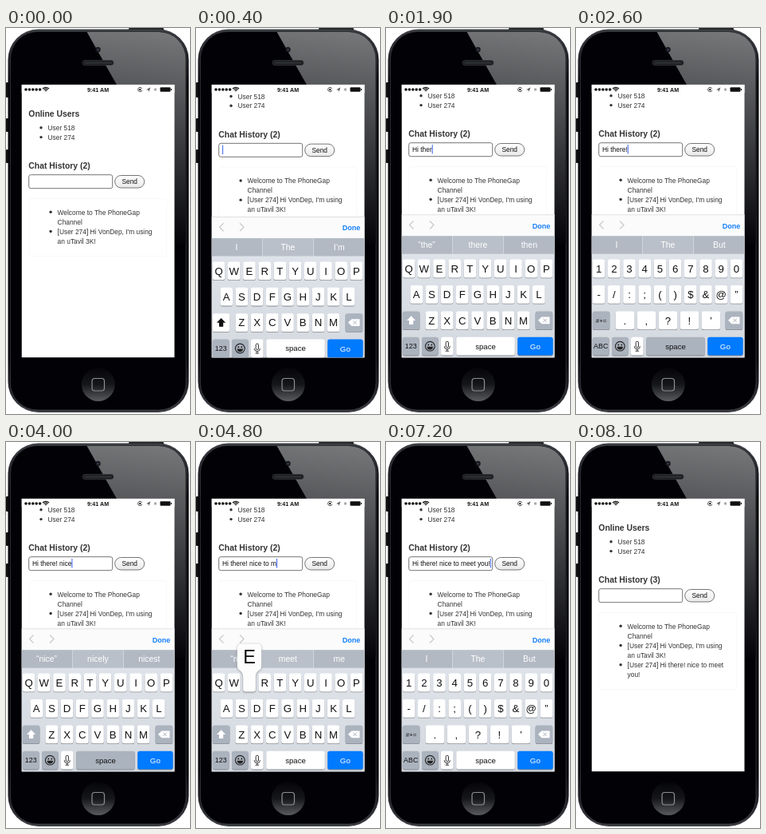
An HTML page with a canvas that plays this animation: 231 px wide and 483 px high, repeating every 8.3 s.

```html
<!DOCTYPE html>
<html lang="en">
<head>
<meta charset="utf-8">
<title>Phone chat</title>
<style>
html, body { margin: 0; width: 100%; height: 100%; overflow: hidden; background: #fff; }
canvas { display: block; width: 231px; height: 483px; }
</style>
</head>
<body>
<canvas id="stage"></canvas>
<script>
const W = 231, H = 483, LOOP = 8300, STEP = 100;
const canvas = document.getElementById('stage');
const c = canvas.getContext('2d');
const dpr = window.devicePixelRatio || 1;
canvas.width = W * dpr;
canvas.height = H * dpr;

const FONT = '"Liberation Sans", Arial, sans-serif';
const BLUE = '#007aff', GREY = '#abb3be', INK = '#333';
const SX = 19.5, SY = 70.7, SW = 192.2, SH = 341.7;

// A press lasts one step; its effect shows on release.
const presses = [
  [600, 'H'], [800, 'i'], [1100, ' '],
  [1400, 't'], [1500, 'h'], [1700, 'e'], [1800, 'r'], [2000, 'e'],
  [2200, '123'], [2400, '!'], [2600, ' '],
  [3000, 'n'], [3200, 'i'], [3500, 'c'], [3700, 'e'], [4000, ' '],
  [4200, 't'], [4300, 'o'], [4500, ' '],
  [4600, 'm'], [4800, 'e'], [5100, 'e'], [5400, 't'], [5600, ' '],
  [6300, 'y'], [6500, 'o'], [6700, 'u'],
  [6900, '123'], [7100, '!'], [7400, 'Go']
];

const hints = {
  '': ['I', 'The', 'I’m'],
  'H': ['“H”', 'He', 'How'],
  'Hi': ['“Hi”', 'His', 'Him'],
  'Hi ': ['’', 'VonDep', '’m'],
  'Hi t': ['“t”', 'there', 'to'],
  'Hi the': ['“the”', 'there', 'then'],
  'Hi there!': ['I', 'The', 'But'],
  'Hi there! n': ['“n”', 'not', 'now'],
  'Hi there! ni': ['“ni”', 'nice', 'night'],
  'Hi there! nice': ['“nice”', 'nicely', 'nicest'],
  'Hi there! nice ': ['to', 'and', 'day'],
  'Hi there! nice t': ['“t”', 'to', 'the'],
  'Hi there! nice to ': ['see', 'meet', 'be'],
  'Hi there! nice to m': ['“m”', 'meet', 'me'],
  'Hi there! nice to mee': ['“mee”', 'meet', 'meets'],
  'Hi there! nice to meet ': ['you', 'the', 'with'],
  'Hi there! nice to meet y': ['“y”', 'you', 'your'],
  'Hi there! nice to meet you!': ['I', 'The', 'But']
};

function stateAt(t) {
  const s = { text: '', hint: hints[''], symbols: false, sent: false, down: null };
  for (const [at, key] of presses) {
    if (t < at) break;
    if (t < at + STEP) { s.down = key; break; }
    if (key === '123') s.symbols = true;
    else if (key === 'Go') { s.text = ''; s.sent = true; }
    else {
      s.text += key;
      if (key === ' ') s.symbols = false;
    }
    s.hint = hints[s.text] || s.hint;
  }
  const clamp = x => Math.max(0, Math.min(1, x));
  const ease = x => 1 - (1 - x) ** 3;
  s.up = ease(clamp((t - 100) / 400)) * (1 - ease(clamp((t - 7700) / 400)));
  s.focus = t >= 100 && t < 7800;
  return s;
}

function round(x, y, w, h, r, fill, stroke, lw = 1) {
  c.beginPath();
  c.roundRect(x, y, w, h, r);
  if (fill) { c.fillStyle = fill; c.fill(); }
  if (stroke) { c.strokeStyle = stroke; c.lineWidth = lw; c.stroke(); }
}

function dot(x, y, r, fill) {
  c.beginPath();
  c.arc(x, y, r, 0, Math.PI * 2);
  c.fillStyle = fill;
  c.fill();
}

function poly(points, fill) {
  c.beginPath();
  points.forEach(([x, y]) => c.lineTo(x, y));
  c.closePath();
  c.fillStyle = fill;
  c.fill();
}

function line(points, stroke, lw) {
  c.beginPath();
  points.forEach(([x, y]) => c.lineTo(x, y));
  c.strokeStyle = stroke;
  c.lineWidth = lw;
  c.stroke();
}

function text(str, x, y, size, color = INK, weight = '', align = 'left') {
  c.font = `${weight} ${size}px ${FONT}`;
  c.textAlign = align;
  c.fillStyle = color;
  c.fillText(str, x, y);
}

function gradient(x0, y0, x1, y1, ...stops) {
  const g = c.createLinearGradient(x0, y0, x1, y1);
  stops.forEach((s, i) => g.addColorStop(i / (stops.length - 1), s));
  return g;
}

function drawPhone() {
  for (const [y, h] of [[68, 19], [113, 17], [152, 17]]) round(0, y, 5, h, 1, '#111');
  round(154, 0, 44, 4, 1, '#222');
  const edge = '#08080c', shine = '#3c3e44';
  round(2.5, 1.5, 227, 479.5, 38,
    gradient(0, 2, 0, 481, shine, edge, edge, edge, edge, edge, edge, shine));
  round(5.5, 4.5, 220.5, 473.5, 34, '#010106', '#35373c', 0.8);

  c.save();
  c.beginPath();
  c.roundRect(6, 5, 219.5, 472.5, 33.5);
  c.clip();
  poly([[101, 4], [226, 4], [226, 270], [211, 270], [211, 71], [139, 71]],
    gradient(200, 4, 170, 270, '#77787a', '#3c3d40', '#010106'));
  c.restore();

  dot(115.5, 27, 3.2, '#16171b');
  dot(115.5, 27, 1.5, '#34384a');
  round(96, 40.5, 39, 6, 3, '#17181a', '#3a3b3e', 0.8);
  round(98, 42, 35, 3, 1.5, '#2c2d30');

  dot(115.8, 446, 21, gradient(0, 425, 0, 467, '#050509', '#15161a', '#5a5b5e'));
  round(108, 438.5, 15.5, 15.5, 3.5, null, '#8e8f93', 1.2);
}

function drawStatus() {
  c.fillStyle = '#fff';
  c.fillRect(SX, SY, SW, 10.5);
  for (let i = 0; i < 5; i++) dot(25 + i * 4.4, 77, 1.8, '#111');
  for (const r of [1.5, 3.5, 5.5]) {
    c.beginPath();
    c.arc(50, 79.8, r, -Math.PI * 0.76, -Math.PI * 0.24);
    c.strokeStyle = '#111';
    c.lineWidth = 1.2;
    c.stroke();
  }
  text('9:41 AM', 115.5, 79.6, 7.1, '#111', 'bold', 'center');
  c.beginPath();
  c.arc(168.3, 77, 2.7, 0.3, 5.8);
  c.strokeStyle = '#222';
  c.lineWidth = 0.8;
  c.stroke();
  c.fillStyle = '#222';
  c.fillRect(167.2, 76, 2.2, 2.2);
  poly([[176, 77.2], [181.5, 74.3], [179.2, 80], [178.7, 77.5]], '#555');
  c.fillStyle = '#aaa';
  c.fillRect(186, 75.5, 3, 3);
  round(193.5, 74.3, 13, 5.4, 1, '#111');
  c.fillRect(207, 76, 1, 2);
}

function bullet(x, y, str) {
  dot(x - 8.5, y - 3.2, 1.7, INK);
  text(str, x, y, 8.4);
}

function drawPage(s) {
  c.save();
  c.translate(0, -40 * s.up);
  text('Online Users', 28.3, 110.5, 10.4, INK, 'bold');
  bullet(52.5, 128, 'User 518');
  bullet(52.5, 139.8, 'User 274');
  text(`Chat History (${s.sent ? 3 : 2})`, 28.3, 176.3, 10.4, INK, 'bold');

  round(28.7, 183.7, 105, 17, 2.5, '#fff', '#747474');
  text(s.text, 33, 195, 8.4, '#111');
  if (s.focus) {
    c.fillStyle = '#4a6ff0';
    c.fillRect(33 + c.measureText(s.text).width, 186, 1.1, 11.5);
  }
  round(136.7, 184.5, 37, 15.5, 7.7, gradient(0, 184, 0, 200, '#fff', '#e9e9e9'), '#666', 0.9);
  text('Send', 155.2, 195, 8.4, '#111', '', 'center');

  round(28.5, 213.5, 173, s.sent ? 96 : 72, 2, null, '#f9f9f9');
  bullet(64.6, 233.5, 'Welcome to The PhoneGap');
  text('Channel', 64.6, 245.6, 8.4);
  bullet(64.6, 257.7, '[User 274] Hi VonDep, I\'m using');
  text('an uTavil 3K!', 64.6, 269.8, 8.4);
  if (s.sent) {
    bullet(64.6, 281.9, '[User 274] Hi there! nice to meet');
    text('you!', 64.6, 294, 8.4);
  }
  c.restore();
}

const rowY = i => 289.6 + i * 32.4;

function key(x, row, w, label, size, fill = '#fff', color = '#111') {
  const y = rowY(row);
  round(x, y + 0.8, w, 22.8, 2.6, '#888c92');
  round(x, y, w, 22.8, 2.6, fill);
  if (label) text(label, x + w / 2, y + 11.4 + size * 0.36, size, color, '', 'center');
}

function popup(x, row, w, label) {
  const y = rowY(row), top = y - 37, m = x + w / 2, half = Math.max(15.3, w / 2 + 6.5);
  c.save();
  c.shadowColor = 'rgba(0,0,0,.4)';
  c.shadowBlur = 2.5 * dpr;
  c.shadowOffsetY = 0.5 * dpr;
  c.beginPath();
  c.moveTo(m - half + 5, top);
  c.arcTo(m + half, top, m + half, top + 6, 5);
  c.lineTo(m + half, y - 9);
  c.bezierCurveTo(m + half, y - 3, x + w, y - 4, x + w, y + 4);
  c.arcTo(x + w, y + 22.8, x, y + 22.8, 2.6);
  c.arcTo(x, y + 22.8, x, y, 2.6);
  c.lineTo(x, y + 4);
  c.bezierCurveTo(x, y - 4, m - half, y - 3, m - half, y - 9);
  c.arcTo(m - half, top, m - half + 5, top, 5);
  c.closePath();
  c.fillStyle = '#fdfdfd';
  c.fill();
  c.restore();
  text(label, m, top + 24.5, 23.5, '#111', '', 'center');
}

function drawShift(on) {
  key(20.8, 2, 21.6, '', 0, on ? '#fff' : GREY);
  poly([[31.6, 360.2], [37.2, 366], [34.2, 366], [34.2, 371], [29, 371], [29, 366], [26, 366]],
    on ? '#111' : '#fff');
}

function drawDelete() {
  key(187.6, 2, 21.6, '', 0, GREY);
  poly([[191, 365.8], [195.4, 361.4], [205.5, 361.4], [205.5, 370.2], [195.4, 370.2]], '#fff');
  line([[197.3, 363.6], [201.7, 368]], GREY, 1);
  line([[201.7, 363.6], [197.3, 368]], GREY, 1);
}

function drawFace(x, y) {
  dot(x, y, 6.4, '#222');
  dot(x, y, 5.3, GREY);
  dot(x - 2, y - 1.8, 1, '#222');
  dot(x + 2, y - 1.8, 1, '#222');
  c.beginPath();
  c.arc(x, y + 0.6, 3.7, 0, Math.PI);
  c.closePath();
  c.fillStyle = '#222';
  c.fill();
}

function drawMic(x, y) {
  round(x - 1.7, y - 6, 3.4, 7.5, 1.7, '#fff', '#222', 0.9);
  c.beginPath();
  c.arc(x, y, 3.6, 0, Math.PI);
  c.stroke();
  line([[x, y + 3.6], [x, y + 6]], '#222', 0.9);
  line([[x - 2.3, y + 6], [x + 2.3, y + 6]], '#222', 0.9);
}

function drawKeys(s) {
  const rows = s.symbols ? ['1234567890', '-/:;()$&@”', '.,?!’'] : ['QWERTYUIOP', 'ASDFGHJKL', 'ZXCVBNM'];
  const starts = s.symbols ? [20.8, 20.8, 49.7] : [20.8, 30.4, 49.6];
  let pressed = null;
  rows.forEach((row, r) => {
    const wide = s.symbols && r === 2;
    const w = wide ? 23.4 : 15.6, pitch = wide ? 27 : 19.2;
    [...row].forEach((ch, i) => {
      const x = starts[r] + i * pitch;
      key(x, r, w, ch, 13.2);
      if (s.down && s.down.toUpperCase() === ch) pressed = [x, r, w, ch];
    });
  });

  if (s.symbols) key(20.8, 2, 21.6, '#+=', 8, GREY);
  else drawShift(s.text === '');
  drawDelete();

  key(20.8, 3, 20.8, s.symbols ? 'ABC' : '123', 8.9, s.down === '123' ? '#fff' : GREY);
  key(45, 3, 20.6, '', 0, GREY);
  drawFace(55.3, 398.2);
  key(69, 3, 15.6, '', 0);
  drawMic(76.8, 398.2);
  key(88.2, 3, 73.6, 'space', 9.6, s.down === ' ' ? GREY : '#fff');
  const go = s.down === 'Go';
  key(165.2, 3, 44.4, 'Go', 9.8, go ? '#fff' : BLUE, go ? '#111' : '#fff');
  if (pressed) popup(...pressed);
}

function drawKeyboard(s) {
  if (s.up <= 0) return;
  c.save();
  c.translate(0, (1 - s.up) * 179);
  c.fillStyle = '#fbfbfb';
  c.fillRect(SX, 233.5, SW, 27);
  c.fillStyle = '#d4d5d7';
  c.fillRect(SX, 233.5, SW, 0.7);
  line([[34.5, 241.5], [29.5, 246.5], [34.5, 251.5]], '#c9c9cb', 1.2);
  line([[55, 241.5], [60, 246.5], [55, 251.5]], '#c9c9cb', 1.2);
  text('Done', 206.3, 250.7, 9, '#147efb', 'bold', 'right');

  c.fillStyle = gradient(0, 283, 0, 412, '#dee2e9', '#d4d8df');
  c.fillRect(SX, 260, SW, 153);
  s.hint.forEach((word, i) => {
    c.fillStyle = i === 1 ? '#bac0c9' : '#b2b9c3';
    c.fillRect(SX + i * 64.2, 260.3, 63.6, 22.4);
    text(word, 51 + i * 64.4, 274.8, 10.4, '#fff', '', 'center');
  });
  drawKeys(s);
  c.restore();
}

function draw(now) {
  const t = Math.floor((now % LOOP) / STEP) * STEP;
  const s = stateAt(t);
  c.setTransform(dpr, 0, 0, dpr, 0, 0);
  c.fillStyle = '#fff';
  c.fillRect(0, 0, W, H);
  drawPhone();
  c.save();
  c.beginPath();
  c.rect(SX, SY, SW, SH);
  c.clip();
  c.fillStyle = '#fff';
  c.fillRect(SX, SY, SW, SH);
  drawPage(s);
  drawStatus();
  drawKeyboard(s);
  c.restore();
}

let start = null;
function tick(now) {
  if (start === null) start = now;
  draw(now - start);
  requestAnimationFrame(tick);
}
draw(0);
requestAnimationFrame(tick);
</script>
</body>
</html>
```
